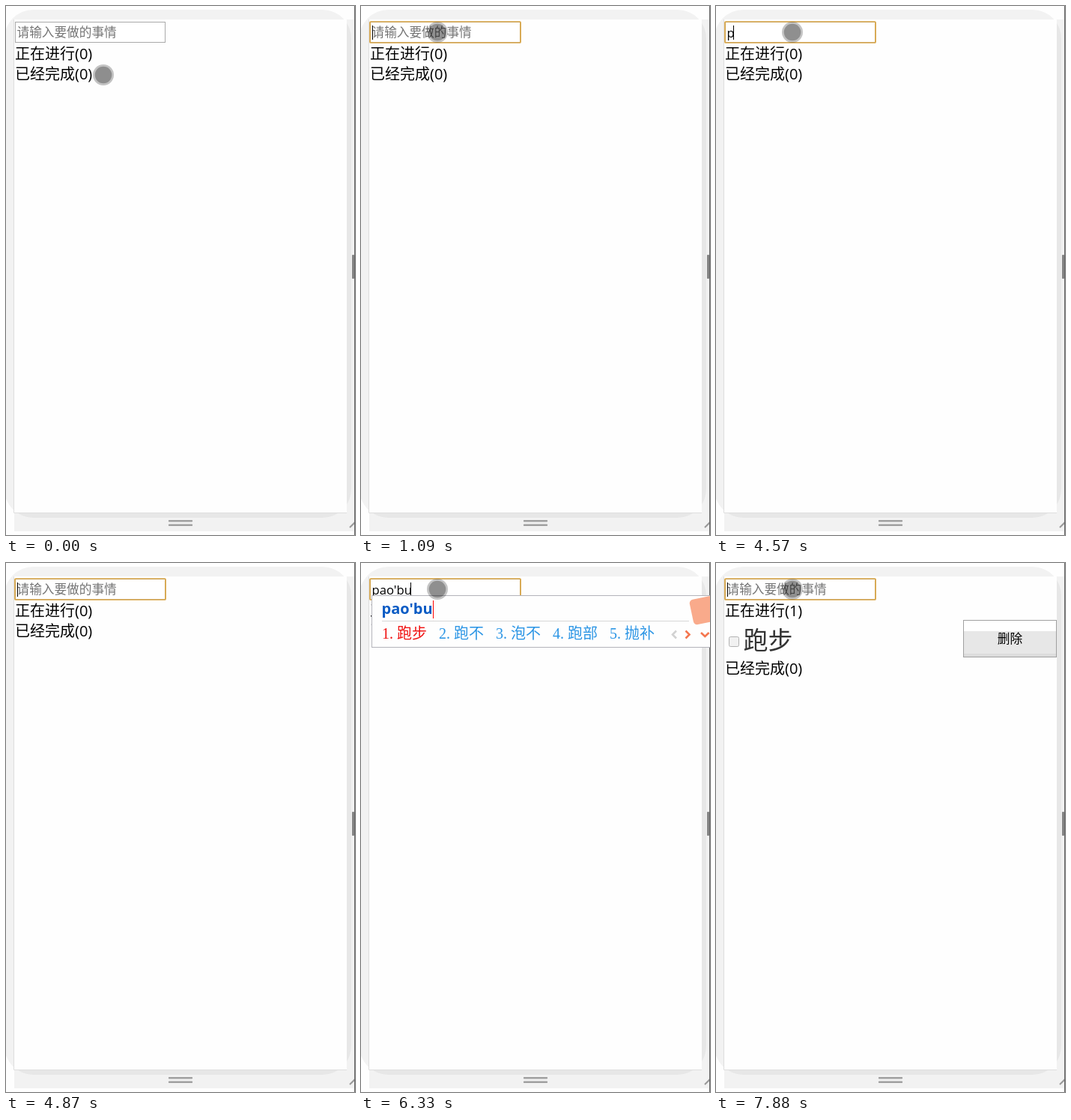
An HTML page for the animation above (8 s loop, 466 px wide and 706 px high).

```html
<!DOCTYPE html>
<html lang="zh-CN">
<head>
<meta charset="utf-8">
<title>待办事项</title>
<style>
  html, body { margin: 0; width: 100%; height: 100%; overflow: hidden; background: #fefefe; }
  svg { display: block; width: 466px; height: 706px; }
  text { font: 20px "Open Sans", "Noto Sans CJK SC", "Noto Sans CJK", sans-serif; white-space: pre; }
  .field { font-size: 16.67px; }
  .hint { fill: #757575; }
  .shade { fill: #000; fill-opacity: .047; }
  .index { font-family: "Liberation Serif", serif; }
  .word { font-family: "Noto Sans CJK SC", "Noto Sans CJK", sans-serif; font-weight: 300; }
  .pinyin { font-weight: 700; fill: #0a5bc4; }
  .arrow { fill: none; stroke: #f4764f; stroke-width: 2.6; }
</style>
</head>
<body>
<svg viewBox="0 0 466 706">
  <!-- device frame and resize bars -->
  <rect class="shade" x="-2" y="5" width="463" height="678" rx="38"/>
  <path class="shade" d="M455 18H466V701H11V677H455Z"/>
  <rect x="11" y="18" width="444" height="659" fill="#fefefe"/>
  <path d="M10.5 18V676.5H455" fill="none" stroke="#dedede"/>
  <path d="M218 687.2H248M218 692.8H248" stroke="#a0a0a0" stroke-width="2.4" stroke-linecap="round"/>
  <path d="M459 696L467 688" stroke="#999" stroke-width="2"/>
  <path d="M465.5 0V706" stroke="#666"/>
  <rect x="462" y="332" width="3" height="32" rx="1" fill="#858585"/>

  <!-- page -->
  <rect id="box" x="12.5" y="21.5" width="200" height="27" fill="#fff" stroke="#a9a9a9"/>
  <rect id="ring" x="12" y="21" width="201" height="28" rx="1" fill="none" stroke="#d9a441" stroke-width="1.7"/>
  <text class="field hint" id="hint" x="14.5" y="40.5">请输入要做的事情</text>
  <text class="field" id="typed" x="14.5" y="41.5"></text>
  <path id="caret" d="M.5 26V45" stroke="#000"/>
  <text id="doing" x="12" y="71"></text>
  <text id="done" x="12" y="98">已经完成(0)</text>
  <g id="item">
    <rect x="17.5" y="98.5" width="13" height="13" rx="2" fill="#f1f1f1" stroke="#b2b2b2"/>
    <text x="36.5" y="115" style="font-size:33px" fill="#333">跑步</text>
    <rect x="330" y="76" width="125" height="50" fill="#e7e7e7"/>
    <path d="M330 76H455V91H330Z" fill="#fff"/>
    <path d="M330 121H455V126H330Z" fill="#dcdcdc"/>
    <rect x="330.5" y="76.5" width="124" height="49" fill="none" stroke="#a0a0a0"/>
    <text class="field" x="392.5" y="107" text-anchor="middle">删除</text>
  </g>

  <!-- input method panel -->
  <g id="panel">
    <rect id="panelBox" x="14.5" y="43.5" height="69" fill="#fefefe" stroke="#b3b3ba"/>
    <path id="divider" stroke="#d6d6d6"/>
    <text class="pinyin" id="pinyin" x="27.5" y="68"></text>
    <path id="panelCaret" d="M.5 50V74" stroke="#f00"/>
    <g id="words"></g>
    <g id="tools">
      <path class="arrow" d="M-57 90.5L-62 95.5L-57 100.5" style="stroke:#d2d2d2"/>
      <path class="arrow" d="M-44.5 90.5L-39.5 95.5L-44.5 100.5"/>
      <path class="arrow" d="M-24 93L-18.7 98L-13.4 93"/>
      <rect x="-37" y="46" width="34" height="34" rx="5" fill="#f9aa8b" transform="rotate(-12 -20 63)"/>
    </g>
  </g>

  <g id="pointer">
    <circle r="14" fill="#000" fill-opacity=".23"/>
    <circle r="11.3" fill="#000" fill-opacity=".27"/>
  </g>
</svg>
<script>
  const LOOP = 8000;
  const $ = id => document.getElementById(id);
  const latest = (steps, t) => steps.findLast(s => s[0] <= t);
  const show = (id, on) => $(id).setAttribute('visibility', on ? 'visible' : 'hidden');
  const move = (id, x, y = 0) => $(id).setAttribute('transform', `translate(${x} ${y})`);

  // [start, x, y]
  const pointerSteps = [
    [0, 130, 92], [270, 119, 72], [390, 107, 42], [510, 109, 25],
    [660, 103, 27], [810, 102, 30], [960, 102, 35]
  ];
  // [start, field text]
  const typingSteps = [
    [0, ''], [3990, 'p'], [4140, 'pa'], [4570, 'p'], [4720, ''],
    [5610, 'p'], [5890, 'pao'], [6330, "pao'bu"], [6630, '跑步'], [7880, '']
  ];
  // [start, panel width, candidates]
  const panelSteps = [
    [0], [5610, 364, '判 鹏 平 排 盘'], [5890, 394, '跑 跑步 泡 炮 抛'],
    [6330, 464, '跑步 跑不 泡不 跑部 抛补'], [6630]
  ];

  function wordMarkup(list) {
    let x = 28;
    return list.split(' ').map((word, i) => {
      const markup = `<g fill="${i ? '#2b95e5' : '#f01010'}">
        <text class="index" x="${x}" y="101">${i + 1}</text>
        <text class="index" x="${x + 10}" y="101">.</text>
        <text class="word" x="${x + 20}" y="101">${word}</text></g>`;
      x += 36 + 20 * word.length;
      return markup;
    }).join('');
  }

  function drawPanel(width, list, text) {
    const right = 14 + width;
    $('panelBox').setAttribute('width', width - 1);
    $('divider').setAttribute('d', `M28 77.5H${right - 40}`);
    $('pinyin').textContent = text;
    move('panelCaret', Math.round(28 + $('pinyin').getComputedTextLength()));
    $('words').innerHTML = wordMarkup(list);
    move('tools', right);
  }

  let lastKey;
  function draw(t) {
    const [, px, py] = latest(pointerSteps, t);
    const [typedAt, text] = latest(typingSteps, t);
    const [panelAt, width, list] = latest(panelSteps, t);
    const focused = t >= 1090, added = t >= 7880;
    const pointing = t < 4870 || t >= 5610;
    const key = [px, py, typedAt, panelAt, focused, added, pointing].join();
    if (key === lastKey) return;
    lastKey = key;

    move('pointer', px, py);
    show('pointer', pointing);
    show('ring', focused);
    show('caret', focused);
    show('hint', !text);
    $('typed').textContent = text;
    move('caret', text ? Math.round(14 + $('typed').getComputedTextLength()) - 1 : 15);
    $('doing').textContent = `正在进行(${+added})`;
    move('done', 0, added ? 50 : 0);
    show('item', added);
    show('panel', width);
    if (width) drawPanel(width, list, text);
  }

  const startTime = performance.now();
  function frame() {
    draw((performance.now() - startTime) % LOOP);
    requestAnimationFrame(frame);
  }
  frame();
</script>
</body>
</html>
```
